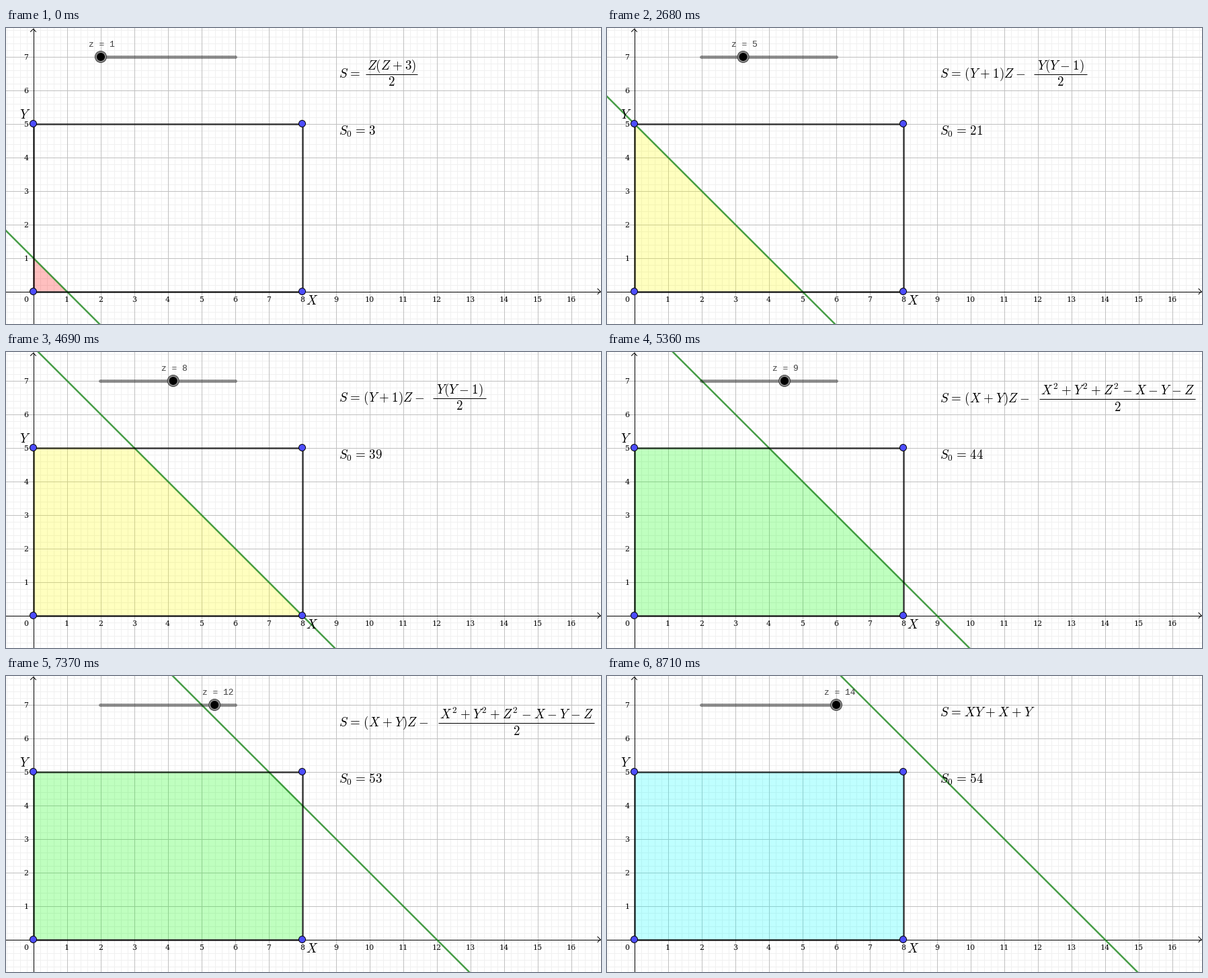
A matplotlib script that plays this animation: 885 px wide and 441 px high, repeating every 9.38 s.

```python
import matplotlib.pyplot as plt
from matplotlib.animation import FuncAnimation
from matplotlib.patches import Circle, Polygon

W, H, DPI = 885, 441, 64
UNIT, OX, OY = 50, 40.5, 392.5
X, Y, FRAMES, STEP = 8, 5, 14, 670
MATH = 19

plt.rcParams["mathtext.fontset"] = "cm"
fig = plt.figure(figsize=(W / DPI, H / DPI), dpi=DPI, facecolor="white")
ax = fig.add_axes([0, 0, 1, 1])
ax.set_xlim(0, W)
ax.set_ylim(H, 0)
ax.axis("off")


def pt(px):
    return px * 72 / DPI


def pos(x, y):
    return OX + UNIT * x, OY - UNIT * y


def line(xs, ys, color, width, z, **kw):
    return ax.plot(xs, ys, color=color, lw=pt(width), zorder=z, **kw)[0]


def label(x, y, s, size, z=9, ha="left", **kw):
    return ax.text(x, y, s, fontsize=pt(size), ha=ha, va="baseline", zorder=z, **kw)


def tex(s):
    # widen relation and operator gaps to TeX spacing
    for op, gap in (("=", ".116"), ("+", ".053"), ("-", ".053")):
        s = s.replace(op, rf"\hspace{{{gap}}}{op}\hspace{{{gap}}}")
    return f"${s}$"


def draw_grid():
    for step, color, z in ((10, "#f0f0f0", 0), (50, "#c0c0c0", 1)):
        for x in range(40 % step, W, step):
            line([x + .5] * 2, [0, H], color, 1, z)
        for y in range(392 % step, H, step):
            line([0, W], [y + .5] * 2, color, 1, z)


def draw_axes():
    line([0, W], [OY, OY], "black", 1, 2)
    line([OX, OX], [1, H], "black", 1, 2)
    line([OX - 4, OX, OX + 4], [5.5, 1.5, 5.5], "black", 1, 2)
    line([W - 5, W - 1, W - 5], [OY - 4, OY, OY + 4], "black", 1, 2)
    digits = dict(size=11, z=2, ha="center", family="DejaVu Serif")
    label(30, 408, "0", **digits)
    for k in range(1, 17):
        label(OX + UNIT * k, 408, str(k), **digits)
    for k in range(1, 8):
        label(30, OY - UNIT * k + 4.5, str(k), **digits)


def draw_box():
    corners = [pos(0, 0), pos(X, 0), pos(X, Y), pos(0, Y)]
    for (x0, y0), (x1, y1) in zip(corners, corners[1:] + corners[:1]):
        line([x0, x1], [y0, y1], "black", 2.5, 5, alpha=.75)
    for c in corners:
        ax.add_patch(Circle(c, 5, fc="#4d4dff", ec="black", lw=pt(1), zorder=7))
    label(20.5, 135, "$Y$", MATH)
    label(446, 411.5, "$X$", MATH)


def formula(lead, base, num="", left=0, right=0, rule=0):
    parts = [label(495, base, tex(lead), MATH)]
    if num:
        mid = (left + right) / 2
        parts += [line([left, right], [rule, rule], "black", 1, 9,
                       solid_capstyle="butt"),
                  label(mid, rule - 6.5, tex(num), MATH, ha="center"),
                  label(mid, rule + 18, "$2$", MATH, ha="center")]
    return parts


def stage(z):
    if z < Y:
        return 0
    if z <= X:
        return 1
    return 2 if z < X + Y else 3


def area(z):
    return sum(min(z - i, Y) + 1 for i in range(min(z, X) + 1))


draw_grid()
draw_axes()
draw_box()

formulas = [
    formula("S =", 74, "Z(Z + 3)", 535, 612, 68.5),
    formula("S = (Y + 1)Z -", 74, "Y(Y - 1)", 635, 714, 68.5),
    formula("S = (X + Y)Z -", 75, "X^2 + Y^2 + Z^2 - X - Y - Z", 643, 875, 69.5),
    formula("S = XY + X + Y", 60),
]
fills = ["red", "yellow", "lime", "cyan"]

region = ax.add_patch(Polygon([(0, 0)] * 3, lw=0, alpha=.25, zorder=3))
slope = line([], [], "#148214", 2.5, 4, alpha=.78)
total = label(495, 160, "", MATH)

line([140, 341], [42.5, 42.5], "black", 5, 6, alpha=.4, solid_capstyle="round")
ring = ax.add_patch(Circle((0, 0), 8.5, fc="#8c8c8c", ec="#404040", lw=pt(1), zorder=8))
knob = ax.add_patch(Circle((0, 0), 6, fc="black", lw=0, zorder=8))
caption = label(0, 28, "", 13, family="Liberation Mono", color="#404040")


def update(i):
    z = i + 1
    n = stage(z)
    right, top = min(z, X), min(z, Y)
    region.set_xy([pos(0, 0), pos(right, 0), pos(right, min(z - right, Y)),
                   pos(min(z - top, X), top), pos(0, top)])
    region.set_facecolor(fills[n])
    ends = [pos(-2, z + 2), pos(z + 2, -2)]
    slope.set_data(*zip(*ends))
    for k, parts in enumerate(formulas):
        for p in parts:
            p.set_visible(k == n)
    total.set_text(tex(f"S_0 = {area(z)}"))
    x = 141 + 200 * i / (FRAMES - 1)
    ring.center = knob.center = (x, 43)
    caption.set_text(f"z = {z}")
    caption.set_x(x - 18)
    return []


anim = FuncAnimation(fig, update, frames=FRAMES, interval=STEP,
                     init_func=lambda: update(0), repeat=True, repeat_delay=0)
plt.show()
```
